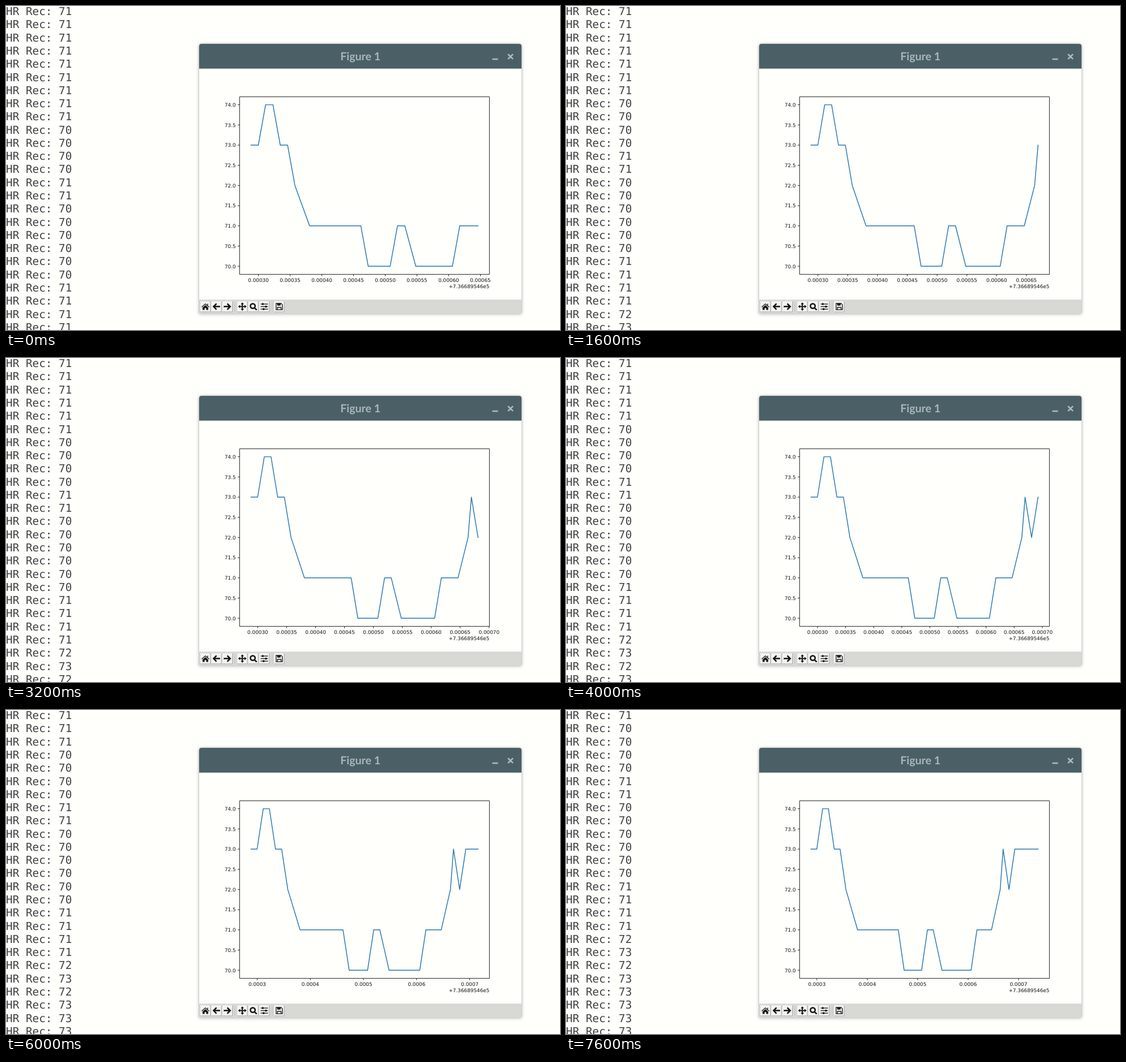
Animation, 978 px wide and 573 px high, one loop 8 s. Source, as an HTML page:

```html
<!DOCTYPE html>
<html lang="en">
<head>
<meta charset="utf-8">
<title>Heart rate plot</title>
<style>
  html, body { margin: 0; width: 100%; height: 100%; overflow: hidden; background: #fffffc; }
  svg { display: block; text-rendering: geometricPrecision; }
  .log { font: 19.34px "DejaVu Sans Mono", monospace; fill: #3f4143; }
  .win { fill: #fffffc; filter: drop-shadow(0 0 1px rgba(0, 0, 0, .25)) drop-shadow(0 1px 3px rgba(0, 0, 0, .28)); }
  .title { font: 700 19.6px Lato, sans-serif; fill: #a9b6b9; text-anchor: middle; }
  .ctl { fill: none; stroke: #b0bcbf; stroke-width: 2.6; }
  .tick { font: 8.85px "DejaVu Sans", sans-serif; fill: #111; }
  .mid { text-anchor: middle; }
  .end { text-anchor: end; }
  .axis { fill: none; stroke: #222; }
  .curve { fill: none; stroke: #2678b0; stroke-width: 1.45; stroke-linejoin: round; stroke-linecap: square; }
  .icon { fill: none; stroke: #111; stroke-width: 2.5; }
  .thin { stroke-width: 1.3; }
  .solid { fill: #111; }
</style>
</head>
<body>
<svg width="978" height="573" viewBox="0 0 978 573">
  <g id="log" class="log"></g>
  <path class="win" d="M341 543.5V71q0-4 4-4H906q4 0 4 4V543.5z"/>
  <path d="M341 110.7V71q0-4 4-4H906q4 0 4 4V110.7z" fill="#4a6066"/>
  <path d="M341 519.3H910V543.5H341z" fill="#d8d8d5"/>
  <text class="title" x="625.7" y="96">Figure 1</text>
  <path class="ctl" d="M858.5 94h10M886.2 85.1l8.8 8.8m0-8.8l-8.8 8.8"/>
  <g id="tools"></g>
  <g id="plot"></g>
</svg>
<script>
const LOOP = 8000, ROWS = 25, PITCH = 23.28;
const FIRST = 32;                      // samples known at the start
const DAY_STEP = 1.155, DAY_START = 28.83; // one second, first sample (1e-5 day)

// When new samples reach the log and the plot
const shared = [1100, 1600, 2700, 4000];
const logTimes = [...shared, 4500, 5500, 6500, 7500];
const plotTimes = [...shared, 5000, 6000, 6500, 7500];

// Runs of equal heart rate: rate, count, wait before the run, pace inside it (s)
const runs = [[73, 2, 0], [74, 2], [73, 2], [72, 1], [71, 9, 2, 7 / 8], [70, 4], [71, 2],
  [70, 6, 1.5], [71, 4, 1, 5 / 6], [72, 1, 1.5], [73, 1, 0.5], [72, 1], [73, 5]];
const samples = [];
let clock = 0;
for (const [rate, count, wait = 1, pace = 1] of runs)
  for (let i = 0; i < count; i++) {
    clock += i ? pace : wait;
    samples.push({ rate, x: DAY_START + clock * DAY_STEP });
  }

const box = { l: 412.4, r: 853.4, t: 160.6, b: 474.6 };
const pad = (box.r - box.l) / 22;
const py = rate => 174.6 + (74 - rate) * 71.4;
const $ = id => document.getElementById(id);
const label = (x, y, cls, s) => `<text class="tick ${cls}" x="${x}" y="${y}">${s}</text>`;

function drawLog(n) {
  $("log").innerHTML = samples.slice(n - ROWS, n)
    .map((s, i) => `<text y="${16.1 + i * PITCH}">HR Rec: ${s.rate}</text>`).join("");
}

function drawPlot(n) {
  const last = samples[n - 1].x;
  const scale = (box.r - box.l - 2 * pad) / (last - DAY_START);
  const px = x => box.l + pad + (x - DAY_START) * scale;
  const step = last > 70 ? 10 : 5, digits = step === 10 ? 4 : 5;
  let ticks = "", text = label(853.4, 499.4, "end", "+7.36689546e5");
  for (let x = 30; px(x) <= box.r; x += step) {
    ticks += `M${px(x)} ${box.b}v3.2`;
    text += label(px(x), 487.6, "mid", (x / 1e5).toFixed(digits));
  }
  for (let rate = 70; rate <= 74; rate += 0.5) {
    ticks += `M${box.l} ${py(rate)}h-3.2`;
    text += label(405.6, py(rate) + 3.3, "end", rate.toFixed(1));
  }
  const points = samples.slice(0, n).map(s => `${px(s.x)},${py(s.rate)}`).join(" ");
  $("plot").innerHTML = `<polyline class="curve" points="${points}"/>
    <path class="axis" d="M${box.l} ${box.t}H${box.r}V${box.b}H${box.l}z${ticks}"/>${text}`;
}

// Icons are drawn around their own centre
const path = (cls, d) => `<path class="${cls}" d="${d}"/>`;
const turn = (angle, art) => `<g transform="rotate(${angle})">${art}</g>`;
const arrow = path("icon", "M-6.5 0H4.5M-.2-5.2L5 0-.2 5.2");
const slider = (y, x) => path("icon thin", `M-6.5 ${y}h13`) + path("solid", `M${x} ${y - 1.7}h2.6v3.4h-2.6z`);
const icons = [
  path("icon thin", "M-6.6 1L0-4.8 6.6 1M4-5v3") + path("solid", "M-5 2L0-2.6 5 2V6H1.4V2.6H-1.4V6H-5z"),
  turn(180, arrow),
  arrow,
  [0, 90, 180, 270].map(a => turn(a, path("solid", "M0-1H4V-3L7.4 0 4 3V1H0z"))).join(""),
  `<circle class="icon" cx="-1" cy="-1" r="4.2"/>` + path("icon", "M2.2 2.2L6 6"),
  slider(-4.5, -4) + slider(0, 1.6) + slider(4.5, -2.5),
  path("icon thin", "M-5.6-5.6H3.2L5.6-3.2V5.6H-5.6zM-3.2 5.4V1.4H3.2V5.4") + path("solid", "M-3.6-5.6H2.4V-1.8H-3.6z")
];
$("tools").innerHTML = path("sep", "M404 522.5V541M470 522.5V541").replace("/>", ' stroke="#c2c2bf"/>') +
  icons.map((art, i) => `<g transform="translate(${352 + 19.4 * i + 7 * Math.floor(i / 3)} 531.6)">
    <path d="M-8.8-9.3H8.8V9.3H-8.8z" fill="#f4f4f1"/>
    <path d="M-8.8 9.3H8.8V-9.3" fill="none" stroke="#a9a9a6"/>${art}</g>`).join("");

const known = (times, t) => FIRST + times.filter(s => s <= t).length;
let logged, plotted;

function frame() {
  const t = performance.now() % LOOP;
  const a = known(logTimes, t), b = known(plotTimes, t);
  if (a !== logged) drawLog(logged = a);
  if (b !== plotted) drawPlot(plotted = b);
  requestAnimationFrame(frame);
}
frame();
</script>
</body>
</html>
```
